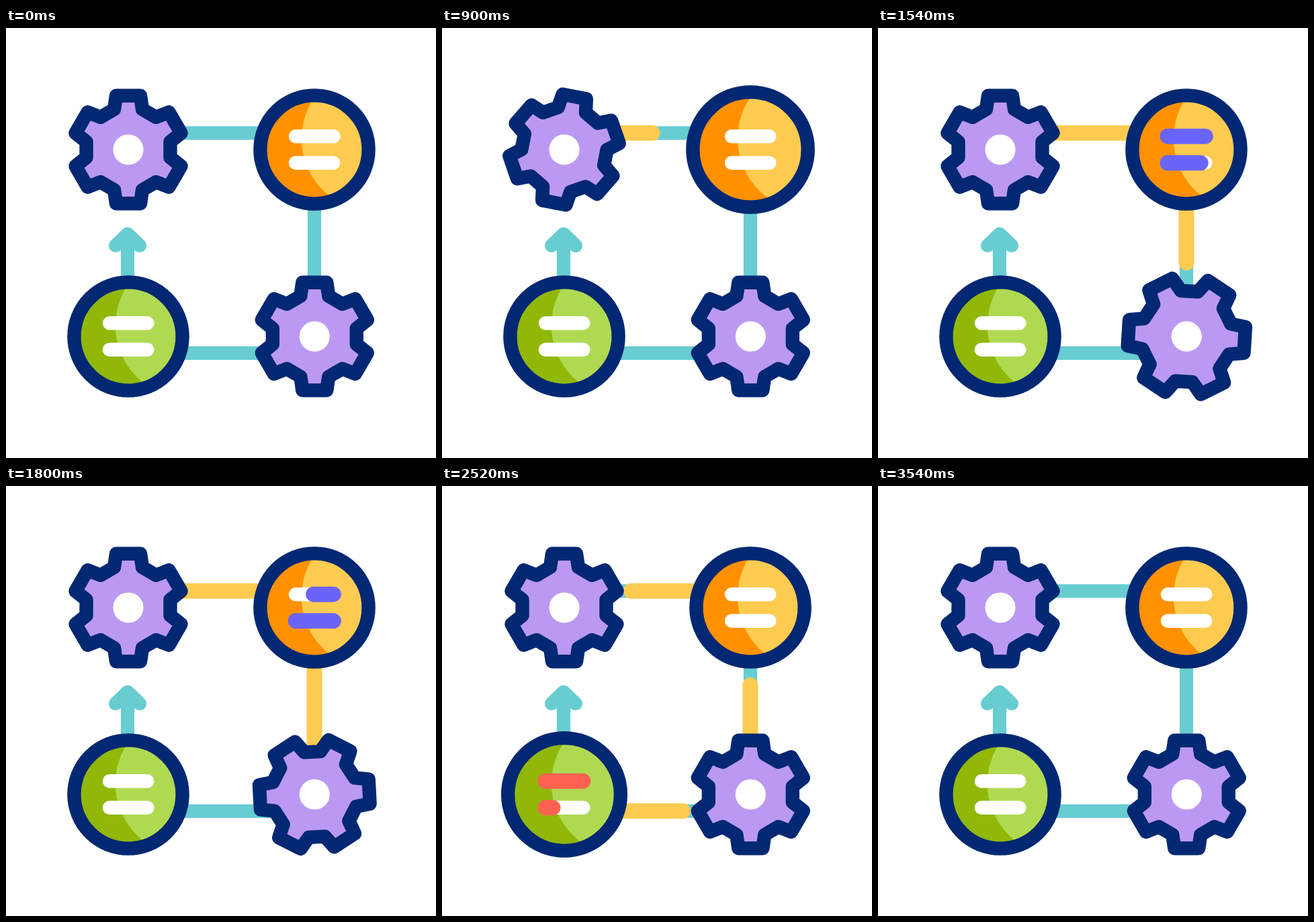
Animation, 640 px wide and 640 px high, one loop 3.6 s. Source, as an HTML page with a canvas:

```html
<!DOCTYPE html>
<html lang="en">
<head>
<meta charset="utf-8">
<title>Process cycle</title>
<style>
html, body { margin: 0; width: 100%; height: 100%; overflow: hidden; background: #fff; }
canvas { display: block; }
</style>
</head>
<body>
<canvas id="stage" width="640" height="640"></canvas>
<script>
const ctx = document.getElementById('stage').getContext('2d');
const LOOP = 3600, TRACE = 400;
const NAVY = '#022873', TEAL = '#67cdd1', YELLOW = '#fecb51', LAVENDER = '#bb99f2';

// Connectors: points, then the start times of growing and of receding.
const connectors = [
  { pts: [[240, 156.3], [385, 156.3]], grow: 700, shrink: 2380 },
  { pts: [[459, 255], [459, 400]], grow: 1300, shrink: 2380 },
  { pts: [[400, 483.8], [255, 483.8]], grow: 1870, shrink: 2380 },
  { pts: [[181, 385], [181, 307]], grow: 2480, shrink: 3080 },
  { pts: [[163, 324], [181, 306.5], [199, 324]], grow: 2624, shrink: 3140 }
];
const gears = [
  { x: 182, y: 181, pop: 240, spin: 360 },
  { x: 459.3, y: 459, pop: 1240, spin: 1345 }
];
const badges = [
  { x: 459, y: 181, pop: 640, dark: '#ff9100', light: '#fecb51', accent: '#6b64fb',
    bars: [[964, 1608], [1230, 1872]] },
  { x: 182, y: 459, pop: 1855, dark: '#91b708', light: '#b0d952', accent: '#ff6250',
    bars: [[2144, 2800], [2408, 3060]] }
];

// Eased progress from 0 to 1.
function ease(t, start, duration) {
  const u = Math.min(1, Math.max(0, (t - start) / duration));
  return u * u * (3 - 2 * u);
}

// Rises to 1 and falls back to 0, each over `half` ms.
const bump = (t, start, half) => ease(t, start, half) - ease(t, start + half, half);

function trace(pts) {
  ctx.beginPath();
  pts.forEach(([x, y]) => ctx.lineTo(x, y));
}

function strokeLine(pts, color, width) {
  trace(pts);
  ctx.strokeStyle = color;
  ctx.lineWidth = width;
  ctx.stroke();
}

function strokeTrimmed(pts, color, t, grow, shrink) {
  const from = ease(t, shrink, TRACE), to = ease(t, grow, TRACE);
  if (to - from < 0.001) return;
  const length = pts.slice(1).reduce((sum, [x, y], i) => sum + Math.hypot(x - pts[i][0], y - pts[i][1]), 0);
  ctx.setLineDash([(to - from) * length, length * 3]);
  ctx.lineDashOffset = -from * length;
  strokeLine(pts, color, 23);
  ctx.setLineDash([]);
}

function disc(x, y, r, color) {
  ctx.beginPath();
  ctx.arc(x, y, r, 0, Math.PI * 2);
  ctx.fillStyle = color;
  ctx.fill();
}

const tooth = [[-21, -60], [-18, -80.3], [18, -80.3], [21, -60]];
const gearOutline = [0, 1, 2, 3, 4, 5].flatMap(i => {
  const c = Math.cos(i * Math.PI / 3), s = Math.sin(i * Math.PI / 3);
  return tooth.map(([x, y]) => [x * c - y * s, x * s + y * c]);
});

function drawGear({ x, y, pop, spin }, t) {
  const scale = 1 + 0.08 * bump(t, pop, 325);
  ctx.save();
  ctx.translate(x, y);
  ctx.rotate(ease(t, spin, 1040) * Math.PI * 2);
  trace(gearOutline.map(([px, py]) => [px * scale, py * scale]));
  ctx.closePath();
  ctx.fillStyle = LAVENDER;
  ctx.fill();
  ctx.strokeStyle = NAVY;
  ctx.lineWidth = 20.4;
  ctx.stroke();
  disc(0, 0, 22.6, '#fff');
  ctx.restore();
}

function drawBadge({ x, y, pop, dark, light, accent, bars }, t) {
  const r = 80.6 + 7.7 * bump(t, pop, 430);
  ctx.save();
  disc(x, y, r, dark);
  ctx.clip();
  disc(x + 89.4, y - 16.3, 108.6, light);
  ctx.restore();
  ctx.beginPath();
  ctx.arc(x, y, r, 0, Math.PI * 2);
  ctx.strokeStyle = NAVY;
  ctx.lineWidth = 20.4;
  ctx.stroke();
  bars.forEach(([grow, shrink], i) => {
    const barY = y - 19.8 + i * 39.6;
    const pts = [[x - 28, barY], [x + 28.3, barY]];
    strokeLine(pts, '#fff', 20.4);
    strokeTrimmed(pts, accent, t, grow, shrink);
  });
}

function draw(now) {
  const t = now % LOOP;
  ctx.fillStyle = '#fff';
  ctx.fillRect(0, 0, 640, 640);
  ctx.lineCap = ctx.lineJoin = 'round';
  connectors.forEach(c => strokeLine(c.pts, TEAL, 20.2));
  connectors.forEach(c => strokeTrimmed(c.pts, YELLOW, t, c.grow, c.shrink));
  gears.forEach(g => drawGear(g, t));
  badges.forEach(b => drawBadge(b, t));
  requestAnimationFrame(() => draw(performance.now()));
}
draw(performance.now());
</script>
</body>
</html>
```
